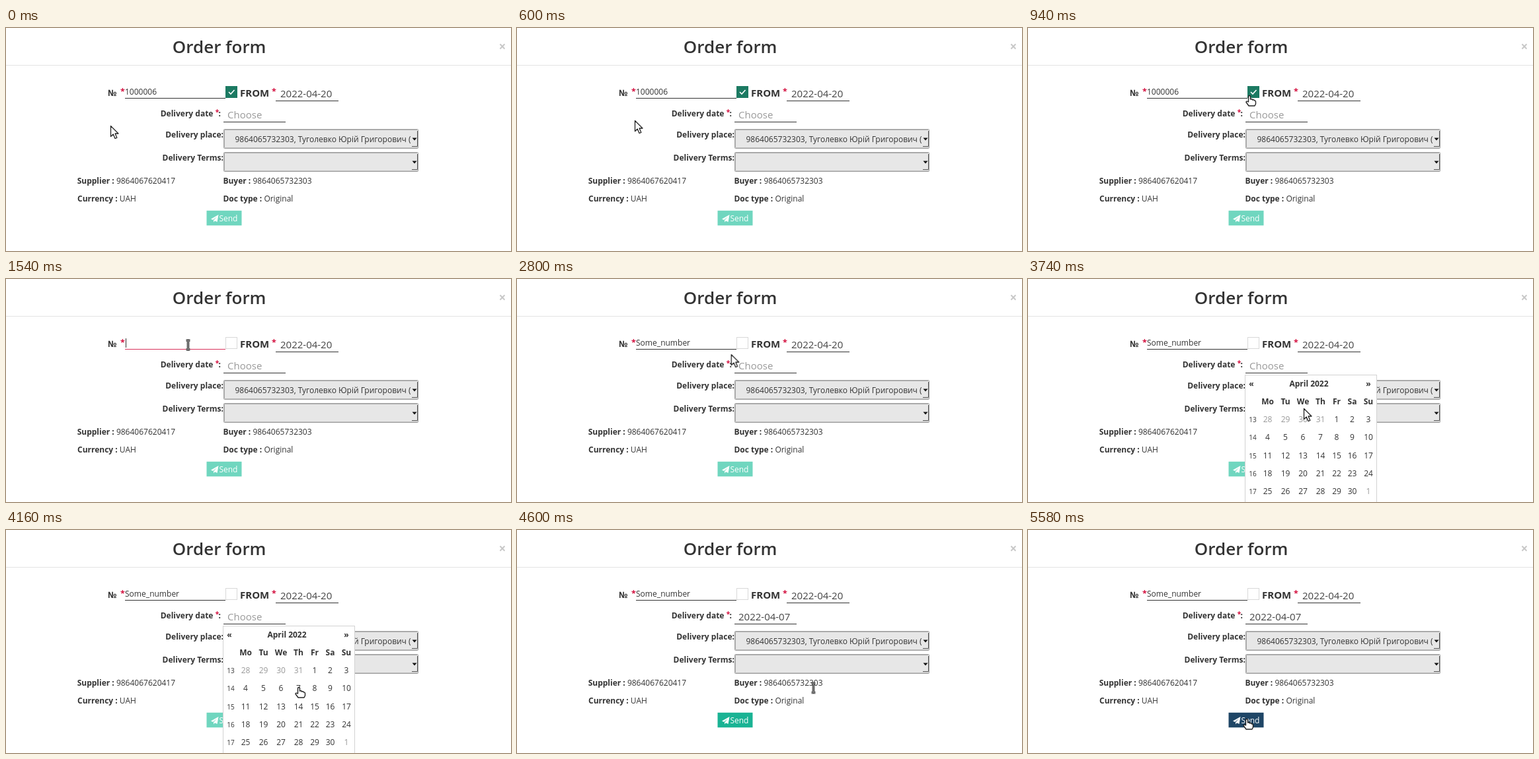
These frames come from a looping animation (764 px wide and 338 px high, 5.62 s). An HTML page:

```html
<!DOCTYPE html>
<html lang="en">
<head>
<meta charset="utf-8">
<title>Order form</title>
<style>
html, body { margin: 0; width: 100%; height: 100%; overflow: hidden; background: #fff; }
svg { display: block; width: 100vw; height: 100vh; }
text { font: 12px "Open Sans", "Noto Sans", sans-serif; fill: #333; white-space: pre; }
.b { font-weight: 700; }
.end { text-anchor: end; }
.mid { text-anchor: middle; }
.title { font-size: 26px; font-weight: 600; }
.close { font-size: 19px; font-weight: 700; fill: #c8c8c8; }
.date { font-size: 15px; fill: #444; }
.star { font-size: 12.5px; font-weight: 700; fill: #d4103f; }
.hint, .old { fill: #999; }
.week { font-size: 10px; }
.line { stroke: #333; }

/* Visibility states */
.auto, .manual, .empty, .caret, .t1, .t2, .t3, .t4, .typed,
.cal, .before, .after, .send, .arrow, .hand, .beam {
  animation: 5620ms step-end infinite;
}
.auto { animation-name: auto; }
.manual { animation-name: manual; }
.empty { animation-name: empty; }
.typed { animation-name: typed; }
.caret { animation-name: caret; }
.t1 { animation-name: t1; }
.t2 { animation-name: t2; }
.t3 { animation-name: t3; }
.t4 { animation-name: t4; }
.cal { animation-name: cal; }
.before { animation-name: before; }
.after { animation-name: after; }
.send { animation-name: send; }
.arrow { animation-name: arrow; }
.hand { animation-name: hand; }
.beam { animation-name: beam; }
.pointer { animation: move 5620ms ease-in-out infinite; }

@keyframes auto { 0% { visibility: visible } 21.7%, 100% { visibility: hidden } }
@keyframes manual { 0% { visibility: hidden } 21.7%, 100% { visibility: visible } }
@keyframes empty {
  0% { visibility: hidden } 21.7% { visibility: visible } 41.28%, 100% { visibility: hidden }
}
@keyframes typed {
  0% { visibility: visible } 21.7% { visibility: hidden } 41.28%, 100% { visibility: visible }
}
@keyframes caret {
  0% { visibility: hidden; transform: none }
  26.3% { visibility: visible; transform: none }
  41.28% { visibility: visible; transform: translateX(6px) }
  41.98% { visibility: visible; transform: translateX(37px) }
  42.69% { visibility: visible; transform: translateX(51px) }
  43.05% { visibility: visible; transform: translateX(82px) }
  47.33%, 100% { visibility: hidden; transform: none }
}
@keyframes t1 { 0% { visibility: hidden } 41.28%, 100% { visibility: visible } }
@keyframes t2 { 0% { visibility: hidden } 41.98%, 100% { visibility: visible } }
@keyframes t3 { 0% { visibility: hidden } 42.69%, 100% { visibility: visible } }
@keyframes t4 { 0% { visibility: hidden } 43.05%, 100% { visibility: visible } }
@keyframes cal {
  0% { visibility: hidden } 57.65% { visibility: visible } 74.37%, 100% { visibility: hidden }
}
@keyframes before { 0% { visibility: visible } 74.37%, 100% { visibility: hidden } }
@keyframes after { 0% { visibility: hidden } 74.37%, 100% { visibility: visible } }
@keyframes send {
  0% { fill: #70d6bf } 74.37% { fill: #1ab394 } 86.47%, 100% { fill: #1f4666 }
}
@keyframes arrow {
  0% { visibility: visible } 15.65% { visibility: hidden }
  48% { visibility: visible } 51.2% { visibility: hidden }
  60.5% { visibility: visible } 68.7% { visibility: hidden }
  84.4% { visibility: visible } 86.47%, 100% { visibility: hidden }
}
@keyframes hand {
  0% { visibility: hidden } 15.65% { visibility: visible }
  23% { visibility: hidden } 68.7% { visibility: visible }
  74.37% { visibility: hidden } 86.47%, 100% { visibility: visible }
}
@keyframes beam {
  0% { visibility: hidden } 23% { visibility: visible }
  48% { visibility: hidden } 51.2% { visibility: visible }
  60.5% { visibility: hidden } 74.37% { visibility: visible }
  84.4%, 100% { visibility: hidden }
}
@keyframes move {
  0%, .71% { transform: translate(158px, 148px); animation-timing-function: ease-in }
  10.68% { transform: translate(178px, 140px) }
  16.2%, 21.35% { transform: translate(335px, 103px) }
  26.69%, 46.62% { transform: translate(275.5px, 100px); animation-timing-function: ease-in }
  49.82% { transform: translate(323.5px, 114px); animation-timing-function: ease-out }
  55.52%, 57.3% { transform: translate(358px, 131px) }
  66.55%, 67.62% { transform: translate(417px, 196px) }
  72.6%, 75.1% { transform: translate(443px, 239px) }
  77.58%, 83.63% { transform: translate(448.5px, 239.5px) }
  87.54%, 100% { transform: translate(331px, 287px) }
}
</style>
</head>
<body>
<svg viewBox="0 0 764 338">
  <defs>
    <g id="select">
      <rect x=".5" y=".5" width="294" height="29" rx="1" fill="#e7e7e7" stroke="#a3a3a3"/>
      <path d="M1.5 28V1.5H293" fill="none" stroke="#b0b0b0"/>
      <path d="M1.5 28.5H294" stroke="#bdbdbd"/>
      <path d="M285 26.5H293.5V3" fill="none" stroke="#555"/>
      <path d="M285.5 13.5H292.500L289 17.500Z" fill="#111"/>
    </g>
    <path id="ibeam" d="M-3-7H-1L0-6L1-7H3M0-6V6M-3 7H-1L0 6L1 7H3"/>
    <clipPath id="value"><path d="M340 153H614.500V183H340Z"/></clipPath>
  </defs>

  <text class="title" x="251.800" y="38">Order form</text>
  <text class="close mid" x="751" y="35">×</text>
  <path d="M0 56.5H764" stroke="#e3e3e3"/>

  <!-- Number -->
  <text class="b" x="154" y="103" style="font-size:13px">№</text>
  <text class="star" x="173" y="101">*</text>
  <text class="auto" x="180" y="101">1000006</text>
  <text x="180" y="101"><tspan class="t1">S</tspan><tspan class="t2">ome_</tspan><tspan class="t3">nu</tspan><tspan class="t4">mber</tspan></text>
  <path class="line typed" d="M180 106.5H332"/>
  <path class="empty" d="M180 106.5H332" stroke="#d8315b"/>
  <path class="line caret" d="M181.5 90V104"/>
  <g class="auto">
    <rect x="332" y="88" width="18" height="18" fill="#1c7a62"/>
    <path d="M337 97L340 100L345.500 94" fill="none" stroke="#fff" stroke-width="1.6"/>
  </g>
  <rect class="manual" x="332.5" y="88.5" width="17" height="17" fill="#fff" stroke="#d9d9d9"/>

  <!-- Dates -->
  <text class="b" x="354" y="104" style="font-size:15px">FROM</text>
  <text class="star" x="402" y="101">*</text>
  <text class="date" x="415" y="105">2022-04-20</text>
  <path class="line" d="M408 110.500H503"/>
  <text class="b" x="233.700" y="134">Delivery date</text>
  <text class="star" x="316.800" y="131" style="font-size:10px">*</text>
  <text class="b" x="321.500" y="134">:</text>
  <text class="date hint before" x="335" y="137" style="fill:#999">Choose</text>
  <text class="date after" x="335" y="137">2022-04-07</text>
  <path class="line" d="M329 142.500H423"/>

  <!-- Selects -->
  <text class="b end" x="329" y="166">Delivery place:</text>
  <use href="#select" x="329" y="153"/>
  <text x="346.500" y="173" clip-path="url(#value)">9864065732303, Туголевко Юрій Григорович (</text>
  <text class="b end" x="329" y="201">Delivery Terms:</text>
  <use href="#select" x="329" y="188"/>

  <!-- Details -->
  <text x="107.700" y="236"><tspan class="b">Supplier : </tspan>9864067620417</text>
  <text x="108" y="263"><tspan class="b">Currency : </tspan>UAH</text>
  <text x="328.400" y="236"><tspan class="b">Buyer : </tspan>9864065732303</text>
  <text x="328.400" y="263"><tspan class="b">Doc type : </tspan>Original</text>

  <rect class="send" x="303.500" y="276.800" width="53" height="22.500"/>
  <path d="M310 289.500L321.500 283L319.500 294L315.800 292.300L314 294.500V291.500L319 286L313 291Z" fill="#fff"/>
  <text x="322.400" y="293" style="fill:#fff">Send</text>

  <!-- Calendar -->
  <g class="cal">
    <rect x="328.500" y="145.500" width="199" height="220" fill="#fff" stroke="#d2d2d2"/>
    <g id="days"></g>
  </g>

  <g class="pointer" stroke-linejoin="round">
    <path class="arrow" d="M.5.5V16.500L4.200 13L7 19.500L9.800 18.300L7.100 12H12Z" fill="#fff" stroke="#222" stroke-width="1.300"/>
    <path class="hand" d="M-1.500 8V1Q-1.500-.5 0-.5T1.500 1V5Q4 4 4.500 6Q7 5 7.300 7Q9.500 6.500 9.500 9V12L8 15H-1L-5 9.500Q-5 7-1.500 9Z" fill="#fff" stroke="#222" stroke-width="1.400"/>
    <g class="beam" fill="none">
      <use href="#ibeam" stroke="#111" stroke-width="3.200"/>
      <use href="#ibeam" stroke="#ddd" stroke-width=".9"/>
    </g>
  </g>
</svg>
<script>
const days = document.getElementById('days');
const columns = [362.5, 389.5, 416, 442.5, 467, 490.5, 515];

function label(text, x, y, style) {
  const node = document.createElementNS('http://www.w3.org/2000/svg', 'text');
  node.textContent = text;
  node.setAttribute('x', x);
  node.setAttribute('y', y);
  node.setAttribute('class', 'mid ' + style);
  days.append(node);
}

label('«', 338, 163, 'b');
label('April 2022', 425, 163, 'b');
label('»', 515, 163, 'b');
['Mo', 'Tu', 'We', 'Th', 'Fr', 'Sa', 'Su'].forEach((d, i) => label(d, columns[i], 190, 'b'));

for (let row = 0; row < 5; row++) {
  const y = 217 + row * 27.25;
  label(13 + row, 340, y, 'week');
  columns.forEach((x, col) => {
    const date = new Date(2022, 2, 28 + row * 7 + col);
    label(date.getDate(), x, y, date.getMonth() === 3 ? '' : 'old');
  });
}
</script>
</body>
</html>
```
